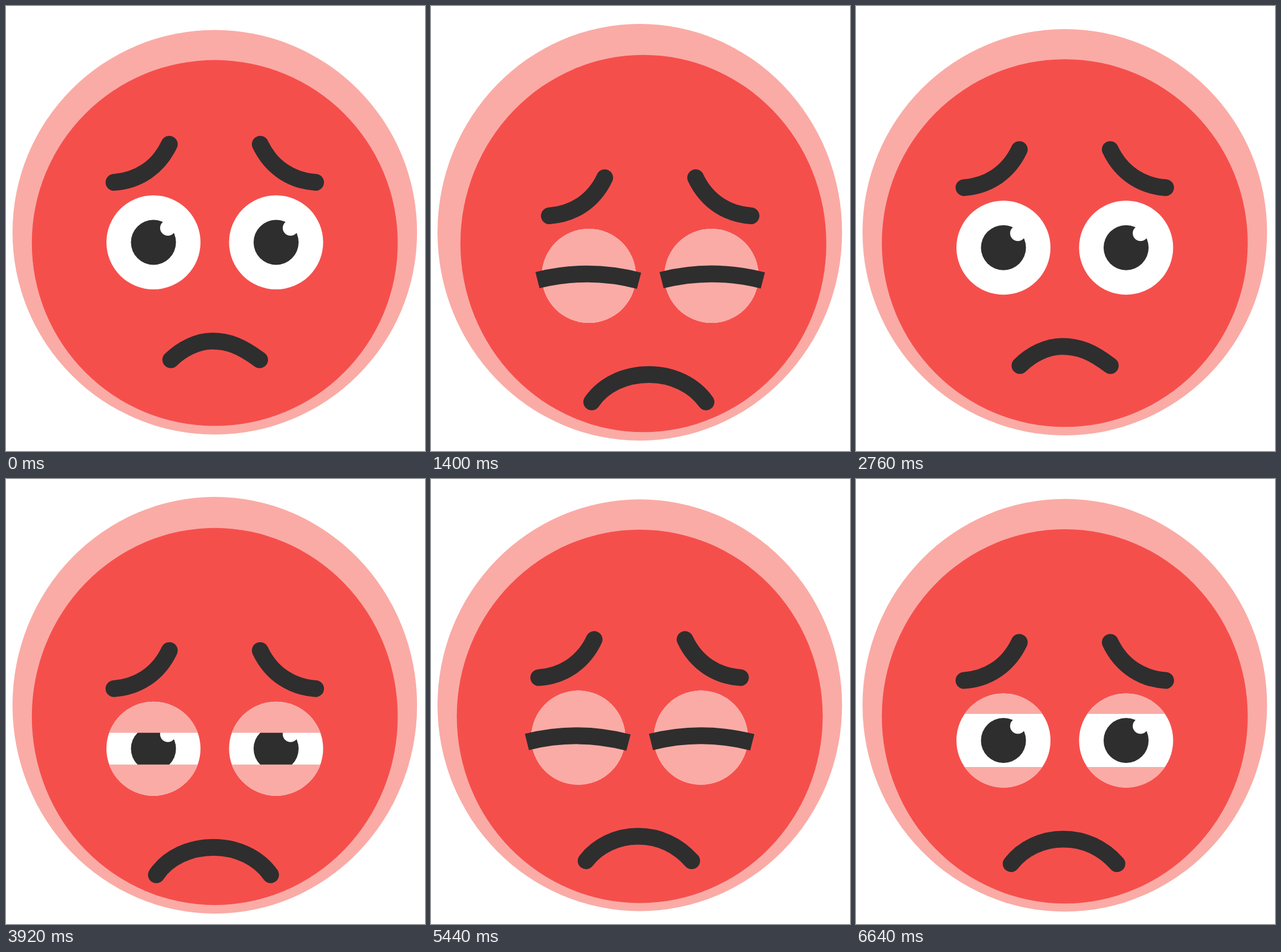
These frames come from a looping animation (726x771 px, 6680 ms). An HTML page:

```html
<!DOCTYPE html>
<html lang="en">
<head>
<meta charset="utf-8">
<title>Sad face</title>
<style>
  html, body { margin: 0; width: 100%; height: 100%; overflow: hidden; background: #fff; }
  svg { display: block; width: 100%; height: 100%; }
  .line { fill: none; stroke: #2e2e2e; stroke-width: 29; stroke-linecap: round; }
  .lash { stroke-linecap: butt; }
  .pink { fill: #faaba6; }
  .red { fill: #f54f4c; }
  .dark { fill: #2e2e2e; }
  .white { fill: #fff; }
</style>
</head>
<body>
<svg viewBox="0 0 726 771">
  <defs>
    <clipPath id="ball"><circle r="81.5"/></clipPath>
    <g id="open">
      <rect class="white" x="-85" y="-85" width="170" height="170"/>
      <circle class="dark" r="39"/>
      <circle class="white" cx="25" cy="-25" r="13.5"/>
    </g>
    <path id="brow" class="line" d="M187 305.5C226 303 263 282 283 239.5"/>
  </defs>
  <ellipse id="halo" class="pink" cx="361.75" cy="392" rx="350.5"/>
  <ellipse id="head" class="red" rx="317"/>
  <g id="face">
    <use href="#brow"/>
    <use href="#brow" transform="translate(723.5 0) scale(-1 1)"/>
    <g transform="translate(255.5 409.5)">
      <g clip-path="url(#ball)">
        <use href="#open"/>
        <rect class="pink upper" x="-85" width="170" height="100"/>
        <rect class="pink lower" x="-85" width="170" height="100"/>
      </g>
      <path class="line lash" d="M-89 7.5Q-1 -14.5 87 8.5"/>
    </g>
    <g transform="translate(468 409.5)">
      <g clip-path="url(#ball)">
        <use href="#open"/>
        <rect class="pink upper" x="-85" width="170" height="100"/>
        <rect class="pink lower" x="-85" width="170" height="100"/>
      </g>
      <path class="line lash" d="M-86.5 7.5Q1 -14.5 89 8"/>
    </g>
    <path id="mouth" class="line"/>
  </g>
</svg>
<script>
const LOOP = 6680, CYCLE = 3000, STEP = 1000 / 12;
const $ = id => document.getElementById(id);
const all = sel => [...document.querySelectorAll(sel)];
const halo = $('halo'), head = $('head'), face = $('face'), mouth = $('mouth');
const uppers = all('.upper'), lowers = all('.lower'), lashes = all('.lash');

// Poses are held at 12 per second on a 40 ms grid, with a shorter tail.
const poses = [];
for (let k = 0; k <= 76; k++) {
  poses.push({ at: Math.round(k * STEP / 40) * 40, time: k * STEP });
}
for (const at of [6440, 6520, 6600, 6640]) poses.push({ at, time: at });

const ease = (t, from, to) => {
  const u = Math.min(1, Math.max(0, (t - from) / (to - from)));
  return (1 - Math.cos(Math.PI * u)) / 2;
};
const mix = (a, b, u) => a + (b - a) * u;

// Mouth control points, at rest and lowered.
const rest = [285.5, 613, 305, 594, 332, 580.5, 357, 580.5, 385, 580.5, 407, 589, 439.5, 613];
const sad = [260.5, 628, 281, 598, 318, 580.5, 360, 580.5, 401, 580.5, 438, 599, 458.5, 628];

const lidGap = t => {
  if (t < 1250) return 46 - (t - 640) * 0.0668;
  return 84 * ease(t, 2440, 2740);
};

function sway(t, right, left) {
  if (t < 1490) return right * ease(t, 1000, 1400);
  if (t < 2010) return mix(right, left, ease(t, 1490, 2000));
  return left * (1 - ease(t, 2050, 2450));
}

function draw(t) {
  const drop = ease(t, 0, 960) - ease(t, 2040, 3000);
  const frown = ease(t, 185, 930) - ease(t, 2120, 2868);
  const stretch = drop * (0.85 + 0.15 * drop ** 4);

  halo.setAttribute('ry', 350.5 + 10.5 * stretch);
  head.setAttribute('cx', 361.75 + sway(t, 6.2, -4));
  head.setAttribute('cy', 410.6 + 0.9 * drop);
  head.setAttribute('ry', 317 + 9.7 * drop);
  face.setAttribute('transform', `translate(${sway(t, 18, -19)} ${58 * drop})`);

  const p = rest.map((v, i) => mix(v, sad[i], frown).toFixed(2));
  mouth.setAttribute('d', `M${p.slice(0, 2)}C${p.slice(2)}`);

  const gap = lidGap(t);
  const closed = t >= 1250 && gap === 0;
  uppers.forEach(r => r.setAttribute('y', -100 - gap + (closed ? 1 : 0)));
  lowers.forEach(r => r.setAttribute('y', gap));
  lashes.forEach(l => l.setAttribute('visibility', closed ? 'visible' : 'hidden'));
}

const start = performance.now();
function tick() {
  const t = (performance.now() - start) % LOOP;
  let pose = poses[0];
  for (const p of poses) if (p.at <= t) pose = p;
  draw(pose.time % CYCLE);
  requestAnimationFrame(tick);
}
tick();
</script>
</body>
</html>
```
